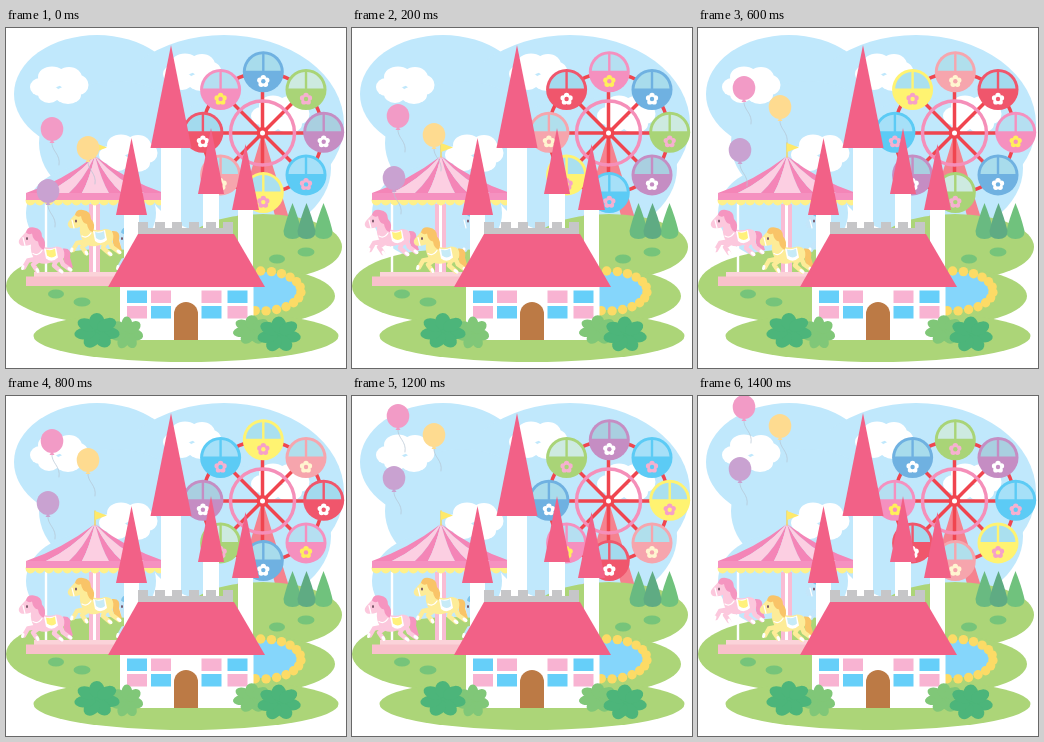
Animation of 340 by 340 pixels, one loop 1600 ms. Source, as an HTML page:

```html
<!DOCTYPE html>
<html lang="en">
<head>
<meta charset="utf-8">
<title>Amusement park</title>
<style>
html, body { margin: 0; height: 100%; overflow: hidden; background: #fff; }
svg { display: block; width: 100vw; height: 100vh; }
</style>
</head>
<body>
<svg id="stage" viewBox="0 0 340 340"></svg>
<script>
const stage = document.getElementById('stage');
const STEP = 200, STEPS = 8;
const rise = [0, 13, 26, 41, 56, 71, 81, 90];

const path = (d, fill, extra = '') => `<path d="${d}" fill="${fill}" ${extra}/>`;
const line = (d, color, width) => path(d, 'none', `stroke="${color}" stroke-width="${width}" stroke-linecap="round" stroke-linejoin="round"`);
const ring = (x, y, r, color, width) => `<circle cx="${x}" cy="${y}" r="${r}" fill="none" stroke="${color}" stroke-width="${width}"/>`;
const oval = (x, y, rx, ry, fill) => `<ellipse cx="${x}" cy="${y}" rx="${rx}" ry="${ry}" fill="${fill}"/>`;
const dot = (x, y, r, fill) => oval(x, y, r, r, fill);
const rect = (x, y, w, h, fill) => `<rect x="${x}" y="${y}" width="${w}" height="${h}" fill="${fill}"/>`;
const group = (x, y, body) => `<g transform="translate(${x} ${y})">${body}</g>`;
const repeat = (n, fn) => Array.from({ length: n }, (_, i) => fn(i)).join('');

const cloud = (x, y) => group(x, y,
  oval(-19, 2, 10, 9, '#fff') + oval(-7, -8, 14, 10.5, '#fff') + oval(10, -7, 13, 11, '#fff') +
  oval(20, 0, 9.5, 10, '#fff') + oval(-10, 9, 11, 9, '#fff') + oval(9, 10, 13, 9, '#fff'));

// Bush made of leaves spread around its middle
const bush = (x, y, rx, ry, fill) => group(x, y, `<g transform="scale(${rx / 20} ${ry / 20})">` +
  dot(0, 0, 13, fill) +
  repeat(7, i => `<g transform="rotate(${i * 51.4 + 12})">${oval(11, 0, 9.5, 6.8, fill)}</g>`) + '</g>');

const flower = (y, petal, heart) => repeat(5, i => {
  const a = (i * 72 - 90) * Math.PI / 180;
  return dot(3.6 * Math.cos(a), y + 3.6 * Math.sin(a), 2.7, petal);
}) + dot(0, y, 2.2, heart);

function scenery() {
  const sky = '#c0e8fc', grass = '#acd578', shade = '#76c47a';
  const pine = (x, fill) => path(`M${x} 175Q${x + 6} 190 ${x + 9} 203Q${x + 9} 211 ${x} 211Q${x - 9} 211 ${x - 9} 203Q${x - 6} 190 ${x} 175Z`, fill);
  return oval(91, 66, 83, 59, sky) + oval(218, 96, 120, 89, sky) +
    oval(110, 115, 77, 62, sky) + oval(85, 185, 65, 48, sky) + oval(230, 140, 95, 70, sky) +
    cloud(53, 57) + cloud(186, 44) + cloud(122, 125) + cloud(274, 86) +
    '<g id="wheel"></g>' +
    oval(257, 219, 79, 33, grass) + oval(100, 258, 100, 37, grass) + oval(235, 268, 94, 30, grass) +
    oval(180, 308, 152.5, 26, grass) +
    oval(50, 266, 8, 4.5, shade) + oval(76, 274, 8.5, 4.5, shade) +
    oval(271, 231, 8, 4.5, shade) + oval(300, 224, 8.5, 4.5, shade) +
    pine(286.5, '#69ba81') + pine(317.5, '#70c27d') + pine(300.5, '#5fab83') +
    oval(256, 263, 38, 19, '#85d6fb') +
    repeat(14, i => {
      const a = (-108 + i * 16) * Math.PI / 180;
      return dot(256 + 39 * Math.cos(a), 263 + 20 * Math.sin(a), 4.7, '#fcdb66');
    });
}

function wheelFrame() {
  const red = '#f0454f', x = 256.5, y = 105;
  return path('M256.500 105L228 200H241L256.500 138L272 200H286Z', '#f5828f') +
    ring(x, y, 60, red, 3.5) +
    repeat(4, i => `<g transform="rotate(${i * 45} ${x} ${y})">${rect(x - 60, y - 1.75, 120, 3.5, red)}</g>`) +
    ring(x, y, 32, '#f58fb9', 3.5) +
    dot(x, y, 6, red) + dot(x, y, 2.5, '#fff');
}

// Body, petal and window colours, clockwise from the top
const cabins = [
  ['#6fb1e1', '#fff', '#a8dcec'], ['#a9d477', '#f6b0d0', '#cdeae0'],
  ['#c58dc3', '#fff', '#a9cfe0'], ['#5ccbf5', '#f6b0d0', '#a6e0f8'],
  ['#fff371', '#f6a0c8', '#aae0ef'], ['#f6a5ad', '#fff5d0', '#b0dfec'],
  ['#f0566c', '#fff', '#a3daee'], ['#f590bf', '#ffef5a', '#b5dff1']
];

const cabin = ([body, petal, glass]) => dot(0, 0, 20.5, body) +
  path('M-17.5 -1A17.5 17.5 0 0 1 -1.2 -17.5V-1ZM17.5 -1A17.5 17.5 0 0 0 1.2 -17.5V-1Z', glass) +
  flower(9.5, petal, body);

function horse(coat, mane, saddle, trim) {
  return path('M57 203Q66 202 64 212Q66 219 67 222Q60 224 58 215Z', mane) +
    line('M32 213L22 215L18 222M34 214L27 219L31 225M54 212L57 219L64 224M51 213L48 220L55 226', coat, 4.5) +
    path('M23 183L27 187Q33 189 35 200Q42 204 50 201Q60 201 58 212Q55 219 45 217Q34 221 28 213Q24 206 25 199Q20 201 15 200Q11 197 14 193Z', coat) +
    path('M20 187Q21 181 28 182Q36 183 36 191Q41 196 38 204Q33 203 32 196Q27 195 26 188Q23 190 20 187Z', mane) +
    line('M17 192L19 200M27 208Q32 211 36 205', trim, 1.2) +
    path('M38 203Q44 205 50 202L52 212Q46 218 40 213Z', '#fff') +
    path('M40 204Q45 206 49 203L50 210Q46 214 41 210Z', saddle) +
    oval(21, 193, 1, 1.6, '#765365') +
    line('M17 221L16.500 223M31 224L32 226M63 223L65 224.500M54 225L56 226.500', '#fff', 3);
}

const horses = [
  { x: 95, low: 0, art: horse('#c3e6fa', '#7fc5ec', '#f7b1d0', '#fff') },
  { x: 0, low: 0, art: horse('#fcc8dd', '#f595c0', '#fff17c', '#fff') },
  { x: 49, low: 1, art: horse('#fdec98', '#f9c468', '#c7ebf7', '#fff') }
];

function carousel() {
  const ends = [20, 40, 63, 76, 103, 116, 138, 158];
  const bend = x => 89 + (x - 89) * .48;
  const roof = repeat(7, i => path(
    `M89 128Q${bend(ends[i])} 153 ${ends[i]} 165H${ends[i + 1]}Q${bend(ends[i + 1])} 153 89 128Z`,
    i % 2 ? '#fccfe2' : '#f485b7'));
  return rect(83, 176, 11, 73, '#f9bcd4') + rect(87, 176, 3, 73, '#fff') +
    rect(38.8, 176, 2.4, 73, '#fff') +
    rect(28, 244, 92, 5, '#fbd3d9') + rect(20, 248.5, 100, 9.5, '#f8c1cb') +
    horses.map(() => '<g class="horse"></g>').join('') +
    roof + repeat(15, i => dot(24.5 + i * 9.2, 172.5, 4.9, '#fff08a')) +
    rect(20, 165, 138, 7, '#f591c0') +
    line('M89 115V129', '#f7d44f', 1.3) + path('M89 115L101 119.500L89 124Z', '#fee96b');
}

function castle() {
  const pink = '#f26187', blue = '#66cff9', rose = '#f8b3d2';
  const tower = (x, top, eave, half, width, foot) =>
    rect(x - width / 2, eave - 1, width, foot - eave + 1, '#fff') +
    path(`M${x} ${top}L${x + half} ${eave}H${x - half}Z`, pink);
  const panes = (x, a, b) => rect(x, 262.5, 20, 12.5, a) + rect(x, 278, 20, 12.5, b);
  return tower(165, 17, 120, 20.5, 20, 202) + tower(205, 100, 166, 13, 16, 202) +
    tower(125.500, 110, 187, 15.5, 15, 240) + tower(239.500, 116, 182, 13.5, 15, 245) +
    rect(132, 200, 95, 7, '#c6c6c8') +
    repeat(6, i => rect(132 + i * 17, 194, 10, 8, '#c6c6c8')) +
    rect(114, 257, 133.500, 55, '#fff') +
    path('M132 206H228L259 259H102Z', pink) +
    panes(121, blue, rose) + panes(145, rose, blue) + panes(195.500, rose, blue) + panes(221.500, blue, rose) +
    path('M168 312V286A12 12 0 0 1 192 286V312Z', '#bc7a45');
}

const bushes = () =>
  bush(121, 305, 16, 16, '#80c778') + bush(91, 303, 22.5, 17.5, '#4cb57a') +
  bush(246, 302, 19, 14.5, '#80c778') + bush(273, 306.5, 21.5, 17.5, '#4cb57a');

const balloons = [[46, 101, '#f29bc6'], [82, 120, '#fedb90'], [42, 163, '#c9a2d1']];
const balloon = color => line('M0 13C-1 22 9 25 7 36', '#b5c4d3', .7) +
  path('M0 10L-2.500 14H2.500Z', color) + oval(0, 0, 11.3, 12, color);

stage.innerHTML = scenery() + carousel() + castle() + bushes() + '<g id="balloons"></g>';
const wheel = document.getElementById('wheel');
const air = document.getElementById('balloons');
const riders = document.querySelectorAll('.horse');
riders.forEach((el, i) => el.innerHTML = horses[i].art);

function draw(step) {
  wheel.innerHTML = wheelFrame() + cabins.map((c, i) => {
    const a = (i + step - 2) * Math.PI / 4;
    return group(257.3 + 60.4 * Math.cos(a), 104.2 + 60.4 * Math.sin(a), cabin(c));
  }).join('');
  riders.forEach((el, i) => {
    const { x, low } = horses[i];
    el.setAttribute('transform', `translate(${x} ${step % 2 === low ? 17.5 : 0})`);
  });
  air.innerHTML = balloons.map(([x, y, c]) => group(x, y - rise[step], balloon(c))).join('');
}

const start = performance.now();
let shown = -1;
function tick() {
  const step = Math.floor((performance.now() - start) / STEP) % STEPS;
  if (step !== shown) draw(shown = step);
  requestAnimationFrame(tick);
}
tick();
</script>
</body>
</html>
```
